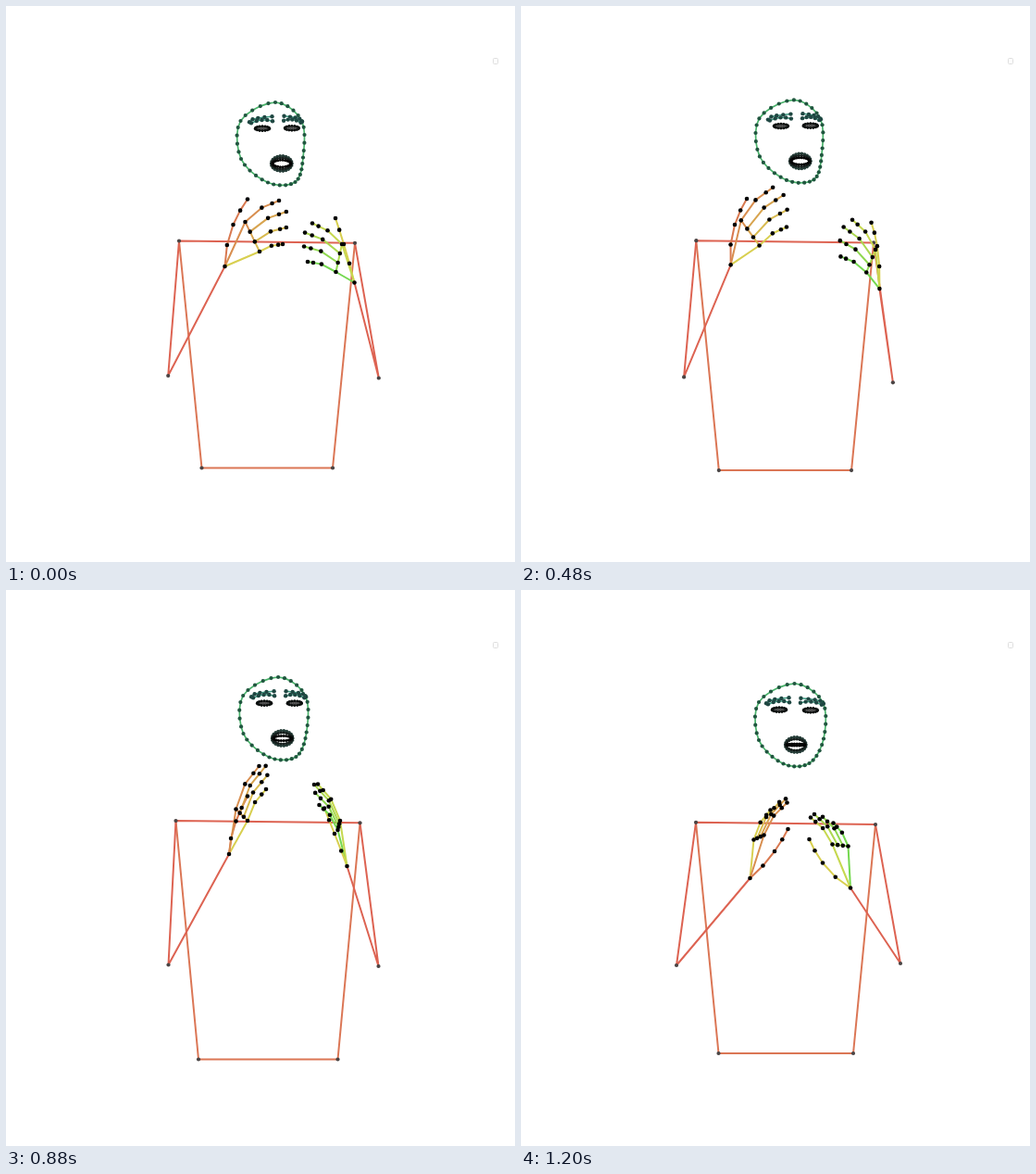
These frames come from a looping animation (550 px wide and 600 px high, 1280 ms). An HTML page with a canvas:

```html
<!DOCTYPE html>
<html lang="en">
<head>
<meta charset="utf-8">
<title>Pose skeleton</title>
<style>
  html, body { margin: 0; width: 100%; height: 100%; overflow: hidden; background: #fff; }
  canvas { display: block; }
</style>
</head>
<body>
<canvas id="stage" width="550" height="600"></canvas>
<script>
const ctx = document.getElementById('stage').getContext('2d');
const LOOP = 1280, STEP = 80;
const RED = '#dd6352', ORANGE = '#db7655';

// Hand key points: wrist, thumb joint and tip, index knuckle and tip, little finger knuckle and tip
const spread = {
  left: [236.5, 281, 245.5, 236, 261, 208.5, 258.5, 233, 295, 210, 274, 265, 299, 257],
  right: [376.5, 298.5, 365, 257, 356, 229, 363, 257, 331, 234.5, 356.5, 287, 326, 276]
};
const raised = {
  left: [233.5, 278, 238, 235, 251, 207, 244.5, 230, 278.5, 194, 264, 256.5, 293, 236],
  right: [383, 303.5, 380, 258, 373.5, 232.5, 378.5, 261, 353.5, 228.5, 369, 285, 341.5, 267.5]
};
const edgeOn = {
  left: [241, 285, 248.5, 249.5, 261, 222.5, 248.5, 236.5, 273.5, 190, 261, 249, 281, 215],
  right: [368.5, 298, 355, 263, 344, 235.5, 361, 249, 337, 209.5, 358.5, 259, 338.5, 232]
};
const cupped = {
  left: [248, 304.5, 274.5, 275.5, 289, 251.5, 263, 258, 288, 223, 252, 263, 270, 231],
  right: [357, 315, 327, 288, 312.5, 262.5, 337.5, 268, 314, 239, 354.5, 270, 338.5, 245]
};

// body: shoulder x left and right, shoulder y, elbow spread, elbow y left and right, hip y
// head: left, top, turn
const poses = [
  pose(0, spread, [0, 0], [0, 0], [187, 377, 253.5, 113.8, 399, 401.5, 498.5], [249.5, 104, 0]),
  pose(160, raised, [0, 0], [0, 0], [187.5, 379, 253.5, 112, 399.5, 404.5, 500], [251, 102.5, 0]),
  pose(320, raised, [-7, 0], [7, 1], [189, 381, 252.5, 113.8, 400, 406.5, 501], [253.5, 101, 0]),
  pose(640, raised, [-5, 3], [0, 1.5], [189, 381, 253.5, 112, 401, 406, 501.5], [253, 101.3, 0]),
  pose(880, edgeOn, [0, 0], [0, 0], [183.5, 382.5, 249, 113.5, 404.5, 406, 506.5], [253, 94, 0.4]),
  pose(1040, cupped, [0, 0], [0, 0], [187, 383, 250, 119.3, 405, 403.5, 501.5], [254.5, 98.7, 0.85]),
  pose(1200, cupped, [-0.5, 6.5], [-1, 6.5], [189, 383, 250.8, 121, 405, 403, 500], [255, 101, 1])
];

function pose(t, shape, shiftL, shiftR, body, head) {
  const move = (list, shift) => list.map((v, i) => v + shift[i % 2]);
  return { t, body, head, left: move(shape.left, shiftL), right: move(shape.right, shiftR) };
}

const mix = (a, b, k) => a + (b - a) * k;
const mixPt = (p, q, k) => [mix(p[0], q[0], k), mix(p[1], q[1], k)];
const along = (p, d, k) => [p[0] + d[0] * k, p[1] + d[1] * k];
const minus = (p, q) => [p[0] - q[0], p[1] - q[1]];
const range = (n, f) => Array.from({ length: n }, (_, i) => f(i));
const pairs = list => range(list.length / 2, i => [list[2 * i], list[2 * i + 1]]);

// Cubic through b and c, guided by their outer neighbours
function hermite(b, c, mb, mc, u) {
  const v = 1 - u;
  return b * v * v * (1 + 2 * u) + c * u * u * (3 - 2 * u) + u * v * (v * mb - u * mc);
}

function sample(part, t) {
  let i = 0;
  while (i < poses.length - 2 && t >= poses[i + 1].t) i++;
  const b = poses[i], c = poses[i + 1], span = c.t - b.t;
  const a = poses[i - 1] || b, d = poses[i + 2] || c;
  return b[part].map((v, n) => hermite(v, c[part][n],
    0.6 * span * (c[part][n] - a[part][n]) / (c.t - a.t),
    0.6 * span * (d[part][n] - v) / (d.t - b.t),
    (t - b.t) / span));
}

function line(points, color, width = 2, closed = false) {
  ctx.beginPath();
  points.forEach(p => ctx.lineTo(p[0], p[1]));
  if (closed) ctx.closePath();
  ctx.strokeStyle = color;
  ctx.lineWidth = width;
  ctx.stroke();
}

function dots(points, color, r) {
  ctx.fillStyle = color;
  for (const [x, y] of points) {
    ctx.beginPath();
    ctx.arc(x, y, r, 0, 2 * Math.PI);
    ctx.fill();
  }
}

function ring(x, y, rx, ry, count) {
  return range(count, i => {
    const a = 2 * Math.PI * i / count;
    return [x + rx * Math.cos(a), y + ry * Math.sin(a)];
  });
}

function drawBody([xl, xr, y, elbow, ely, ery, hip], wristL, wristR) {
  const shL = [xl, y], shR = [xr, y + 2.3];
  const elL = [289 - elbow, ely], elR = [289 + elbow, ery];
  const hipL = [xl + 24.5, hip], hipR = [xr - 24, hip];
  line([shL, hipL, hipR, shR], ORANGE);
  line([wristL, elL, shL, shR, elR, wristR], RED);
  dots([shL, shR, elL, elR, hipL, hipR], '#4a4545', 2.1);
}

// Thumb on a parabola from the wrist through its middle joint
function thumb(wrist, mid, tip) {
  const bow = minus(mid, mixPt(wrist, tip, 0.6));
  return [0.3, 0.6, 0.82, 1].map(u => along(mixPt(wrist, tip, u), bow, u * (1 - u) / 0.24));
}

// Four joints from knuckle to tip, arched towards the thumb side
function finger(knuckle, tip, side) {
  const [dx, dy] = minus(tip, knuckle);
  const bend = along(mixPt(knuckle, tip, 0.54), [dy * side, -dx * side], 0.08);
  return [knuckle, bend, mixPt(bend, tip, 0.6), tip];
}

// Middle and ring fingers lie between the outer two and reach further
function handFingers([wrist, mid, tip, ik, it, lk, lt], side) {
  const inner = [1, 2].map(n => {
    const k = mixPt(ik, lk, n / 3), t = mixPt(it, lt, n / 3);
    return finger(k, along(t, minus(t, k), 0.22 - 0.02 * n), side);
  });
  return [thumb(wrist, mid, tip), finger(ik, it, side), ...inner, finger(lk, lt, side)];
}

function drawHand(keys, side, hue, hueStep) {
  const wrist = keys[0], fingers = handFingers(keys, side);
  const color = i => `hsl(${hue + hueStep * i}, 64%, 58%)`;
  for (let i = 2; i < 5; i++) line([fingers[i - 1][0], fingers[i][0]], color(i - 1));
  line([wrist, fingers[4][0]], color(4));
  fingers.forEach((f, i) => line(i < 2 ? [wrist, ...f] : f, color(i)));
  dots([wrist, ...fingers.flat()], '#000', 2.3);
}

// Outline keys: x, y and sideways slide when the head turns
const outline = [[41.5, 0, -1], [70, 20, 1], [71.5, 59.5, 0.5], [63, 86, -6.5], [33.5, 86.5, -5], [4.5, 61, -2.5], [4, 20, -2]];

function drawOutline(x, y, turn) {
  const keys = outline.map(([kx, ky, slide]) => [x + kx + slide * turn, y + ky]);
  const key = i => keys[(i + keys.length) % keys.length];
  const points = range(35, n => {
    const i = Math.floor(n / 5), u = n % 5 / 5;
    return [0, 1].map(c => hermite(key(i)[c], key(i + 1)[c],
      (key(i + 1)[c] - key(i - 1)[c]) / 2, (key(i + 2)[c] - key(i)[c]) / 2, u));
  });
  line(points, '#4ab36b', 1.7, true);
  dots(points, '#20563f', 2.1);
}

function drawEye(x, y) {
  ctx.fillStyle = '#777';
  ctx.beginPath();
  ctx.ellipse(x, y, 7, 2.3, 0, 0, 2 * Math.PI);
  ctx.fill();
  for (let k = -5; k <= 5; k += 2) line([[x + k, y - 2.5], [x + k, y + 2.5]], '#222', 0.9);
  const rim = ring(x, y, 7.8, 2.5, 16);
  line(rim, '#111', 1, true);
  dots(rim, '#0b0f0e', 1.4);
}

function drawBrow(x, y, scale) {
  const upper = range(5, i => {
    const u = (i / 4) ** 1.4;
    return [x + scale * mix(-14, 10.5, u), y - 7 - 6 * u ** 0.35];
  });
  const lower = range(5, i => {
    const u = i / 4;
    return [x + scale * mix(-12, 11, u), y - 6 - 2 * u - 9 * u * (1 - u)];
  });
  for (const row of [upper, lower]) {
    line(row, '#3a9a80', 1.5);
    dots(row, '#1f4742', 2.2);
  }
}

function drawMouth(x, y, open) {
  const lips = [
    [11.2, 8.2, '#263d38', 1.8],
    [10.8, 6, '#171f1d', 1.5],
    [9.8, mix(1, 3.7, open), '#050505', 1.5]
  ];
  for (const [rx, ry, color, r] of lips) {
    const lip = ring(x, y, rx, ry, 22);
    line(lip, color, 1.4, true);
    dots(lip, color, r);
  }
}

function drawHead([x, y, turn]) {
  drawOutline(x, y, turn);
  const eyeL = [x + 27.5 - 3.5 * turn, y + 28.2];
  const eyeR = [x + 59.4 - 1.5 * turn, y + 27.8 + turn];
  drawBrow(...eyeL, 1);
  drawBrow(...eyeR, -0.8 - 0.2 * turn);
  drawEye(...eyeL);
  drawEye(...eyeR);
  drawMouth(x + 48.3 - 6.5 * turn, y + 66, 1 - turn);
}

function drawBadge() {
  ctx.strokeStyle = '#dedede';
  ctx.lineWidth = 1;
  ctx.beginPath();
  ctx.roundRect(526.5, 56.5, 5, 6, 1);
  ctx.stroke();
}

function draw(t) {
  ctx.fillStyle = '#fff';
  ctx.fillRect(0, 0, 550, 600);
  ctx.lineJoin = 'round';
  const left = pairs(sample('left', t)), right = pairs(sample('right', t));
  drawBadge();
  drawBody(sample('body', t), left[0], right[0]);
  drawHead(sample('head', t));
  drawHand(left, 1, 18, 9.5);
  drawHand(right, -1, 56, 12);
}

const start = performance.now();
function tick() {
  const t = (performance.now() - start) % LOOP;
  draw(Math.floor(t / STEP) * STEP);
  requestAnimationFrame(tick);
}
tick();
</script>
</body>
</html>
```
